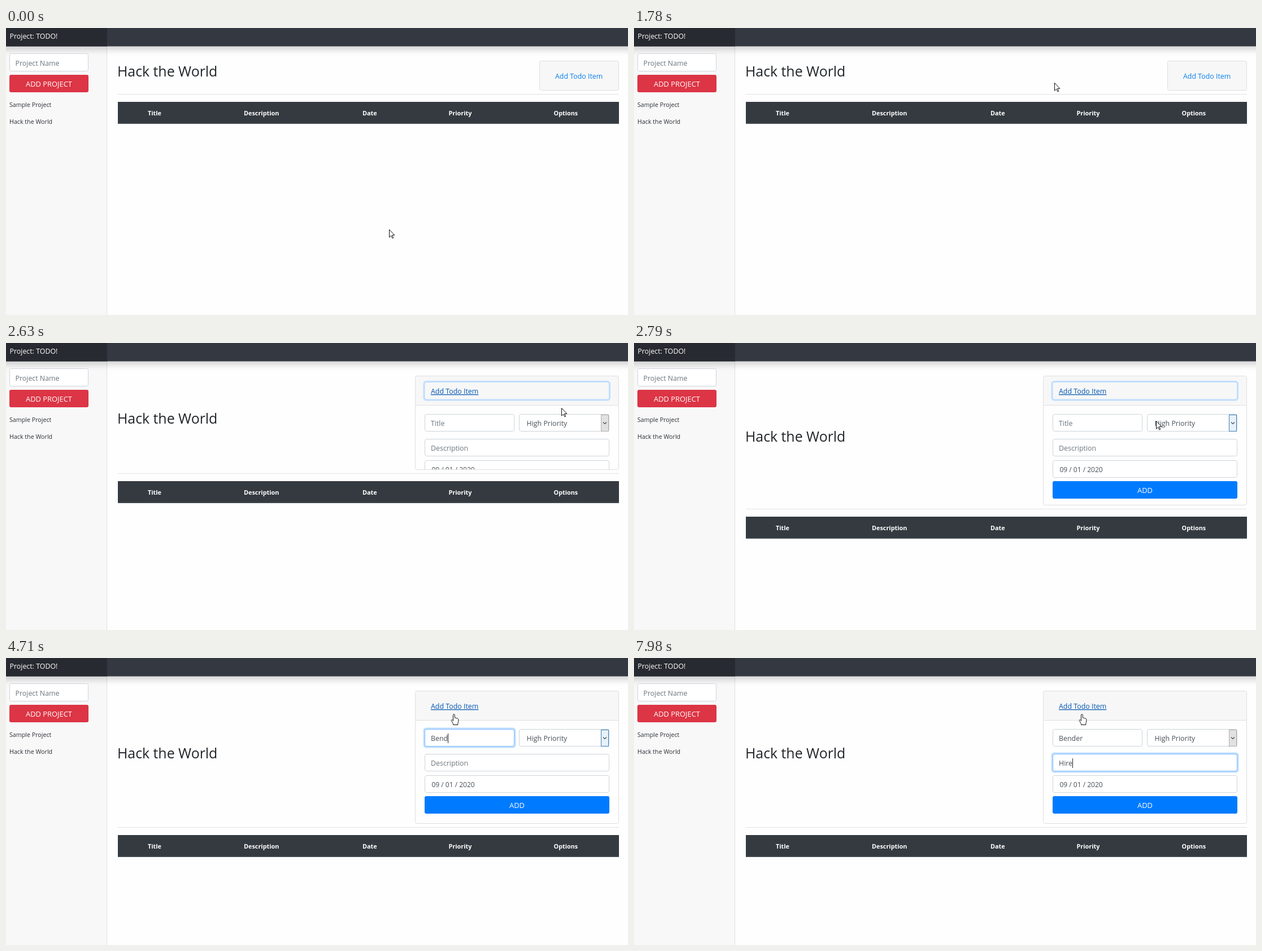
An HTML page for the animation above (8000 ms loop, 1101 by 509 pixels).

```html
<!DOCTYPE html>
<html lang="en">
<head>
<meta charset="utf-8">
<title>Todo list</title>
<style>
  html, body { margin: 0; width: 100%; height: 100%; overflow: hidden; background: #fefefe; }
  svg { display: block; width: 1101px; height: 509px; }
  text { font: 12.4px "Open Sans", "Noto Sans", sans-serif; fill: #495057; white-space: pre; }
  .dark { fill: #212529; }
  .white { fill: #fff; }
  .caps { font-size: 12.9px; fill: #fff; text-anchor: middle; }
  .item { font-size: 10.7px; fill: #2b2f33; }
  .hint { fill: #6c757d; }
  .head text { font-size: 10.85px; font-weight: 700; fill: #fff; }
  .field { fill: #fff; stroke: #ced4da; }
  .ring { fill: none; stroke: #bfdeff; stroke-width: 3; }
  .edge { fill: none; stroke: #80bdff; }
  .caret { fill: #222; }
  .ptr { fill: #fff; stroke: #111; stroke-linejoin: round; }
  #link.hot { fill: #0056b3; text-decoration: underline; }
  #link { fill: #0a7fee; }
</style>
</head>
<body>
<svg viewBox="0 0 1101 509">
  <defs>
    <clipPath id="fold"><rect id="foldBox" x="720" y="111" width="370" height="0"/></clipPath>
    <filter id="soft" x="-5%" y="-50%" width="110%" height="250%"><feGaussianBlur stdDeviation="6"/></filter>
  </defs>
  <rect width="1101" height="509" fill="#fefefe"/>
  <rect width="179" height="509" fill="#f8f8f9"/>
  <rect x="178" width="1" height="509" fill="#dfe0e1"/>
  <rect x="-20" y="6" width="1141" height="33" opacity=".16" filter="url(#soft)"/>
  <rect width="1101" height="32.5" fill="#343840"/>
  <rect width="179" height="32.5" fill="#272a30"/>
  <text class="white" x="6.5" y="19">Project: TODO!</text>

  <rect class="field" x="6.5" y="45.5" width="139" height="31" rx="3"/>
  <text class="hint" x="16.5" y="67">Project Name</text>
  <rect x="6" y="83" width="140" height="31" rx="3" fill="#dc3545"/>
  <text class="caps" x="76" y="104">ADD PROJECT</text>
  <text class="item" x="6" y="140">Sample Project</text>
  <text class="item" x="6" y="170">Hack the World</text>

  <text id="title" class="dark" x="197" y="86" style="font-size:24.9px">Hack the World</text>
  <g id="table" class="head">
    <rect x="198" y="117" width="887" height="1" fill="#e3e3e4"/>
    <rect x="198" y="131" width="887" height="39" fill="#343a40"/>
    <rect x="198" y="168.5" width="887" height="1.5" fill="#454d55"/>
    <text x="251" y="155">Title</text>
    <text x="421" y="155">Description</text>
    <text x="631" y="155">Date</text>
    <text x="783.5" y="155">Priority</text>
    <text x="969.5" y="155">Options</text>
  </g>

  <rect id="cardTop" y="58.5" height="52" rx="3" fill="#f7f7f7"/>
  <rect id="cardLine" x="724" y="110" width="361" height="1" fill="#dfdfdf"/>
  <rect id="card" y="58.5" rx="3" fill="none" stroke="#dfdfdf"/>
  <rect id="linkRing" class="ring" x="740" y="68.5" width="328.5" height="32.5" rx="4"/>
  <text id="link" y="90">Add Todo Item</text>

  <g clip-path="url(#fold)">
    <rect class="field" x="741.5" y="126.5" width="158" height="30" rx="3"/>
    <g id="nameRing">
      <rect class="ring" x="740" y="125" width="161" height="33" rx="4"/>
      <rect class="edge" x="741.5" y="126.5" width="158" height="30" rx="3"/>
    </g>
    <text id="name" x="752" y="147"></text>
    <rect class="field" x="908.5" y="126.5" width="159" height="30" rx="3"/>
    <g id="pickRing">
      <rect class="ring" x="907" y="125" width="162" height="33" rx="4"/>
      <rect class="edge" x="908.5" y="126.5" width="159" height="30" rx="3"/>
    </g>
    <text x="921.5" y="147">High Priority</text>
    <rect id="drop" x="1053.5" y="127.5" width="13" height="29"/>
    <path d="M1057 140.5l3 3 3-3" fill="none" stroke="#444" stroke-width="1.1"/>
    <rect class="field" x="741.5" y="170.5" width="326" height="30" rx="3"/>
    <g id="noteRing">
      <rect class="ring" x="740" y="169" width="329" height="33" rx="4"/>
      <rect class="edge" x="741.5" y="170.5" width="326" height="30" rx="3"/>
    </g>
    <text id="note" x="752" y="191"></text>
    <rect class="field" x="741.5" y="208.5" width="326" height="30" rx="3"/>
    <text x="753.5" y="229" style="font-size:12px">09 / 01 / 2020</text>
    <rect x="741" y="245" width="327" height="31" rx="3" fill="#007bff"/>
    <text class="caps" x="904.5" y="266">ADD</text>
    <rect id="nameCaret" class="caret" y="134" width="1" height="17"/>
    <rect id="noteCaret" class="caret" y="178" width="1" height="17"/>
  </g>

  <g id="mouse">
    <circle id="press" cx="-1" cy="-.5" r="9.5" fill="#ffff5c" opacity=".85"/>
    <path id="arrow" class="ptr" d="M.5.5V14.2L3.7 11.2 6 16 7.8 15.1 5.5 10.4H9.8Z"/>
    <path id="hand" class="ptr" d="M-1.5 1.2a1.4 1.4 0 0 1 2.8 0V6l2.2.5 2.1.5 1.4.6q.8.4.8 1.6V12q0 2-1 3.5v3H-1.5V16.5L-4.4 11.6q-.8-1.4.2-2t1.6.6l1.1 1.2Z"/>
    <path id="beam" d="M-3-6.5H-.6L0-6 .6-6.5H3M0-6V6M-3 6.5H-.6L0 6 .6 6.5H3" fill="none" stroke="#444"/>
  </g>
</svg>
<script>
const LOOP = 8000;
const $ = id => document.getElementById(id);
const set = (id, attrs) => { for (const k in attrs) $(id).setAttribute(k, attrs[k]); };
const show = (id, on) => set(id, { opacity: +on });
const clamp = v => Math.max(0, Math.min(1, v));
const within = (t, ...spans) => spans.some(([a, b]) => t >= a && t < b);
const last = (rows, t) => rows.filter(r => r[0] <= t).pop();

// Pointer moves in discrete steps: first, last, count
const spans = [[70, 840, 11], [910, 1220, 5], [1610, 2400, 11], [2476, 3240, 11], [3320, 3700, 6]];
// Pointer path: time, x, y
const path = [
  [0, 678, 357], [150, 640, 340], [300, 420, 235], [450, 180, 145], [600, 70, 128], [840, 32, 140],
  [910, 33, 142], [1070, 42, 161], [1600, 42, 161], [1610, 60, 160], [1689, 330, 130],
  [1768, 744, 97], [1847, 900, 80], [1926, 975, 77], [2084, 1000, 75], [2476, 1000, 75],
  [2629, 983, 115], [2780, 925, 138], [2930, 860, 145], [3080, 836, 146], [3320, 835, 145],
  [3396, 826, 135], [3548, 800, 107], [3624, 793, 100], [LOOP, 793, 100]
];
const shapes = [[0, "arrow"], [600, "hand"], [1610, "arrow"], [1926, "hand"], [2550, "arrow"],
  [3000, "beam"], [3470, "arrow"], [3620, "hand"]];
const names = [[0, ""], [4240, "B"], [4390, "Be"], [4560, "Ben"], [4710, "Bend"], [4880, "Bende"], [5030, "Bender"]];
const notes = [[0, ""], [6740, "H"], [6970, "Hi"], [7830, "Hir"], [7980, "Hire"]];

function snap(t) {
  const s = last(spans, t);
  if (!s) return 0;
  const gap = (s[1] - s[0]) / (s[2] - 1);
  return Math.min(s[1], s[0] + Math.floor((t - s[0]) / gap + 1e-6) * gap);
}

function pointAt(t) {
  const i = Math.max(1, path.findIndex(p => p[0] > t));
  const [t0, x0, y0] = path[i - 1], [t1, x1, y1] = path[i];
  const u = (t - t0) / (t1 - t0);
  return [x0 + (x1 - x0) * u, y0 + (y1 - y0) * u];
}

const glow = (id, t, on, off) =>
  show(id, clamp((t - on) / 150) - clamp((t - off) / 150));

function field(id, value, hint, caretOn) {
  const el = $(id);
  el.textContent = value || hint;
  el.setAttribute("class", value ? "" : "hint");
  const x = 752 + (value ? el.getComputedTextLength() : 0);
  set(id + "Caret", { x: Math.round(x), opacity: +caretOn });
}

function draw(t) {
  const step = snap(t);
  const open = t >= 2476;
  const grow = 183 * (1 - (1 - clamp((step - 2501) / 350)) ** 2.15);
  const left = open ? 724.5 : 944.5;

  set("title", { y: 86 + Math.round(grow / 2) });
  set("table", { transform: `translate(0 ${Math.round(grow)})` });
  set("cardTop", { x: left, width: 1084.5 - left });
  set("card", { x: left, width: 1084.5 - left, height: 52 + Math.round(grow) });
  set("foldBox", { height: Math.max(0, Math.round(grow) - 1) });
  show("cardLine", open);

  set("link", { x: open ? 752 : 972 });
  $("link").classList.toggle("hot", within(t, [1920, 3150], [3620, LOOP]));
  glow("linkRing", t, 2400, 3150);
  if (!open) show("linkRing", false);
  glow("nameRing", t, 3150, 5260);
  glow("pickRing", t, 5260, 5890);
  glow("noteRing", t, 5890, LOOP);

  const lit = within(t, [2780, 5260]);
  set("drop", { fill: lit ? "#e5f1fb" : "#e1e1e1", stroke: lit ? "#3c7fb8" : "#adadad" });
  field("name", last(names, t)[1], "Title", within(t, [3150, 5260]));
  field("note", last(notes, t)[1], "Description", within(t, [5890, 6440], [6740, 7520], [7830, LOOP]));

  const [x, y] = pointAt(step);
  set("mouse", { transform: `translate(${Math.round(x)} ${Math.round(y)})` });
  const shape = last(shapes, t)[1];
  for (const s of ["arrow", "hand", "beam"]) show(s, s === shape);
  show("press", within(t, [1220, 1390], [2400, 2476], [3150, 3320]) ? 0.85 : 0);
}

const start = performance.now();
function tick() {
  draw((performance.now() - start) % LOOP);
  requestAnimationFrame(tick);
}
tick();
</script>
</body>
</html>
```
